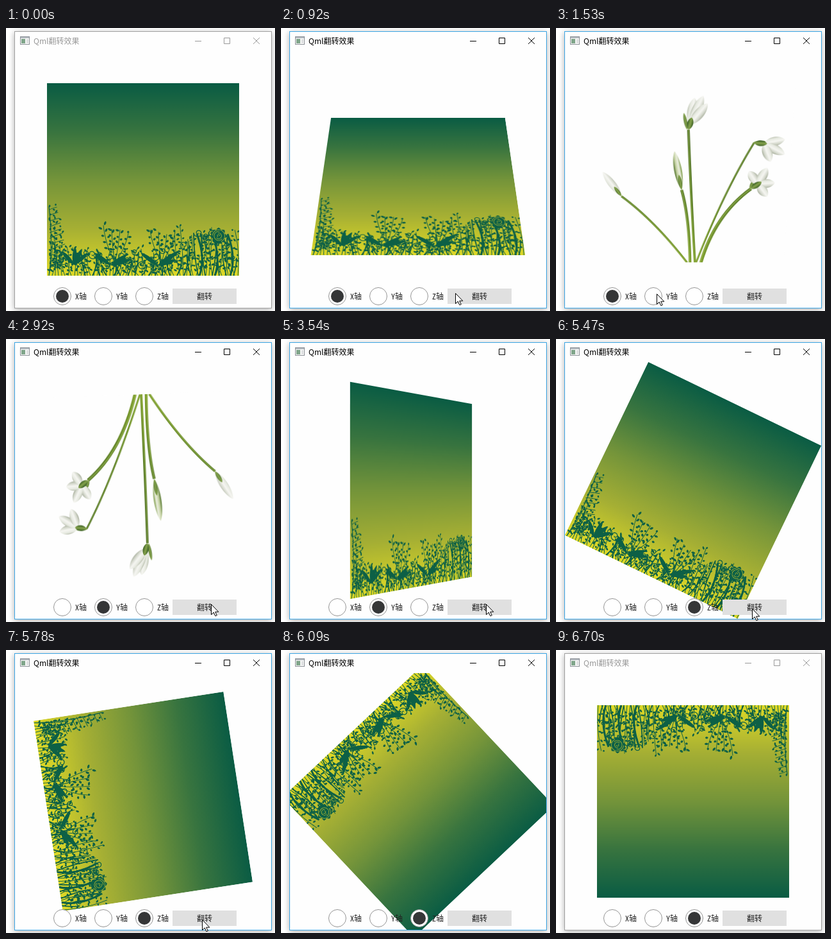
An HTML page with a canvas that plays this animation: 420 px wide and 441 px high, repeating every 6780 ms.

```html
<!DOCTYPE html>
<html lang="zh">
<head>
<meta charset="utf-8">
<title>Qml翻转效果</title>
<style>
html, body { margin: 0; width: 100%; height: 100%; overflow: hidden; background: #fff; }
#win {
  position: absolute; left: 13px; top: 5px; width: 400px; height: 430px;
  background: #fefefe; border: 1px solid #a0a0a0; box-shadow: 0 2px 9px rgba(0, 0, 0, .32);
}
#win.active { border-color: #3ba5e4; }
#view { position: absolute; left: 0; top: 30px; width: 400px; height: 400px; overflow: hidden; }
canvas { position: absolute; left: 50px; top: 50px; width: 300px; height: 300px; }
svg { position: absolute; left: 0; top: 0; }
text { font: 12px "Noto Sans CJK SC", "Noto Sans CJK", sans-serif; }
.label { font-family: "Noto Sans Mono CJK SC", "Noto Sans CJK SC", "Noto Sans CJK", monospace; fill: #222; }
</style>
</head>
<body>
<div id="win"><div id="view"><canvas id="back"></canvas><canvas id="front"></canvas></div></div>
<svg width="420" height="441" viewBox="0 0 420 441">
  <g id="icon">
    <rect x="22.5" y="13.5" width="14" height="12" fill="#f6f6f6" stroke="#8b9096"/>
    <path d="M23 15H36" stroke="#b4bac0" stroke-width="2"/>
    <rect x="24" y="17" width="6" height="7" fill="#7fa58a"/>
    <path d="M32 18.5H35M32 20.5H35M32 22.5H35" stroke="#c4c8cb"/>
  </g>
  <g id="caption">
    <text x="43" y="25">Qml翻转效果</text>
    <path d="M295 20.5H305M340.5 15.5H349.5V24.5H340.5ZM386 15L396 25M396 15L386 25" fill="none" stroke="currentColor"/>
  </g>
  <g id="radios"></g>
  <rect x="260" y="406" width="100" height="24" fill="#e0e0e0"/>
  <text class="label" x="310" y="423" text-anchor="middle">翻转</text>
  <path id="cursor" d="M.5 .5V16.5L4.2 13L6.9 18.7L9.3 17.6L6.7 12.2H11.8Z" fill="#fff" stroke="#000"/>
</svg>
<script>
const $ = id => document.getElementById(id);
const LOOP = 6780, FIRST = 150, STEP = 77.06, LAST = 85;
const AXES = ['X', 'Y', 'Z'];
const HOME = [292, 445];

// pointer moves: start, duration, x, y
const MOVES = [
  [73, 308, 281, 421], [458, 72, 272, 413], [920, 155, 157, 414], [2077, 228, 320, 413],
  [4234, 154, 212, 413], [4928, 228, 306, 420], [5776, 150, 312, 442]
];

function context(id) {
  const cv = $(id);
  cv.width = cv.height = 600;
  const c = cv.getContext('2d');
  c.scale(2, 2);
  return c;
}

function gradient(c, x1, y1, x2, y2, colors) {
  const g = c.createLinearGradient(x1, y1, x2, y2);
  colors.forEach((col, i) => g.addColorStop(i / (colors.length - 1), col));
  return g;
}

function bow(c, x, y, mx, my, u, v, width, color) {
  c.beginPath();
  c.moveTo(x, y);
  c.quadraticCurveTo(mx, my, u, v);
  c.lineWidth = width;
  c.strokeStyle = color;
  c.stroke();
}

function blade(c, x, y, angle, len, wide, fill) {
  c.save();
  c.translate(x, y);
  c.rotate(angle);
  c.beginPath();
  c.moveTo(0, 0);
  c.bezierCurveTo(len * .25, -wide, len * .8, -wide * .9, len, 0);
  c.bezierCurveTo(len * .8, wide * .9, len * .25, wide, 0, 0);
  c.fillStyle = fill;
  c.fill();
  c.restore();
}

function paintGarden() {
  const c = context('front'), ink = '#0d6046';
  let seed = 29;
  const rnd = (a, b) => {
    seed = (seed * 16807) % 2147483647;
    return a + (b - a) * seed / 2147483647;
  };
  const leaf = (x, y, a, len, wide) => blade(c, x, y, a, len, wide, ink);
  c.fillStyle = gradient(c, 0, 0, 0, 300, ['#0a5c44', '#38743f', '#74943a', '#a5af34', '#dfd926']);
  c.fillRect(0, 0, 300, 300);

  // bent twig, leafy on both sides from a given share of its length
  function twig(x, y, u, v, bend, bare, size) {
    const mx = (x + u) / 2 + bend, my = (y + v) / 2;
    bow(c, x, y, mx, my, u, v, .9, ink);
    const n = Math.hypot(u - x, v - y) * (1 - bare) / 5;
    for (let i = 0; i <= n; i++) {
      const k = bare + (1 - bare) * i / n, m = 1 - k;
      const a = Math.atan2(v - y, u - x) + (i % 2 ? 1 : -1) * rnd(.4, 1.4);
      const gap = rnd(0, 4);
      leaf(m * m * x + 2 * m * k * mx + k * k * u + gap * Math.cos(a),
        m * m * y + 2 * m * k * my + k * k * v + gap * Math.sin(a), a, size * rnd(.7, 1.3), size * .42);
    }
  }
  function curl(x, y, r, dir) {
    c.beginPath();
    for (let a = 0; a < 9; a += .25) {
      const q = r * (1 - a / 10);
      c.lineTo(x + q * Math.cos(a) * dir, y + q * Math.sin(a));
    }
    c.lineWidth = 1.2;
    c.strokeStyle = ink;
    c.stroke();
  }
  function bouquet(x) {
    for (let i = 0; i < 4; i++) twig(x, 280, x - 18 + i * 13, rnd(215, 236), (i - 1.5) * 4, .38, 5.5);
    bow(c, x, 300, x + 4, 288, x, 276, 2, ink);
    for (const a of [-.6, -.3, -2.5]) leaf(x - 6, 284, a, rnd(28, 42), 4.5);
  }
  const height = x => x < 30 ? 62 : x < 205 ? 46 : 80;

  // ferns along the left edge
  bow(c, 3, 300, 10, 250, 3, 192, 1.2, ink);
  for (let y = 193; y < 290; y += 9) twig(4, y + 4, 15 + (y - 190) * .2, y - rnd(0, 6), -2, 0, 4.5);

  for (let x = 3; x < 300; x += 5) {
    const h = height(x);
    twig(x, 300, x + rnd(-9, 9), 300 - h * rnd(.4, 1), rnd(-8, 8), .15, 4.4);
  }
  for (let x = 60; x < 298; x += 11) {
    const r = rnd(5, 9), y = 300 - height(x) * rnd(.3, .85), dir = rnd(0, 1) < .5 ? -1 : 1;
    curl(x, y, r, dir);
    bow(c, x, 300, x + dir * r, (y + 300) / 2, x + dir * r, y, 1.7, ink);
  }
  for (const a of [-2.3, -1.5, -1.1, -.7]) leaf(42, 283, a, 28, 4.5);
  bouquet(106);
  bouquet(179);
  for (let x = 238; x < 300; x += 24) bow(c, x, 300, x + 10, 272, x - 4, 235, 3, ink);

  // rose
  for (let i = 0; i < 8; i++) leaf(268, 238, i * .785, 13, 6);
  for (let r = 2; r < 10; r += 2.5) {
    c.beginPath();
    c.arc(268, 238, r, r, r + 4.2);
    c.lineWidth = .8;
    c.strokeStyle = '#a9b431';
    c.stroke();
  }
}

// foot x, bend x/y, head x/y, stem width, flower angle, spread, petals, length
const PLANTS = [
  [140, 88, 222, 37, 179, 3.6, -2.15, 0, 1, 50],
  [145, 144, 215, 132, 168, 4.6, -1.73, 0, 1, 66],
  [153, 146, 160, 143, 68, 4, -1.15, .5, 3, 45],
  [155, 199, 170, 243, 89, 3, .5, 1.4, 3, 34],
  [163, 185, 212, 241, 166, 5.4, -.6, 3.1, 4, 28]
];

function paintSnowdrops() {
  const c = context('back');
  c.fillStyle = '#fefefe';
  c.fillRect(0, 0, 300, 300);
  const green = gradient(c, 0, -4, 0, 4, ['#40642a', '#86a44c', '#486a2c']);
  const white = gradient(c, 0, -9, 0, 9, ['#a9b09c', '#e6e9e0', '#f6f6f2', '#d2d6ca', '#959d88']);
  const hull = gradient(c, 0, -6, 0, 6, ['#55762f', '#c6d3a4', '#edf0e2', '#7b9a45']);

  PLANTS.forEach(([foot, mx, my, x, y, width, angle, spread, count, len], n) => {
    bow(c, foot, 300, mx, my, x, y, width, gradient(c, 0, 80, 0, 300, ['#56762e', '#5f812c', '#7f9f30']));
    bow(c, foot - width / 4, 300, mx - width / 4, my, x, y, width / 4, 'rgba(172,198,90,.6)');
    if (count === 1) {
      blade(c, x, y, angle, len, 8.5, n ? hull : white);
      blade(c, x, y, angle, len * .4, 4, green);
      return;
    }
    // green cup between the stem and the fan of petals
    const tilt = n === 3 ? .1 : -.8;
    const px = x + 15 * Math.cos(tilt) * (n === 2 ? .2 : 1), py = y + 11 * Math.sin(tilt);
    blade(c, x - 2, y, angle - .6, len * .6, 3.5, green);
    for (let i = 0; i < count; i++) {
      const a = angle + spread * (i / (count - 1) - .5);
      blade(c, px, py, a, len * (i === 1 ? 1.1 : .95), 10.5, white);
    }
    blade(c, x, y, Math.atan2(py - y, px - x), 20, 6.5, green);
  });
}

function buildRadios() {
  $('radios').innerHTML = AXES.map((name, i) => {
    const x = 88 + 64 * i;
    return `<circle id="ring${i}" cx="${x}" cy="418" r="13.5" fill="#fff" stroke="#949494"/>` +
      `<circle id="dot${i}" cx="${x}" cy="418" r="10" fill="#353637"/>` +
      `<text class="label" x="${x + 20}" y="423">${name}轴</text>`;
  }).join('');
}

const part = (t, start, len) => Math.min(1, Math.max(0, (t - start) / len));

function angleAt(t) {
  if (t < 2500) return 180 * part(t, 670, 1000);
  if (t < 5000) return 180 * (1 - part(t, 2845, 972));
  return 180 * part(t, 5324, 1000);
}

function pointerAt(t) {
  return MOVES.reduce(([x, y], [start, len, u, v]) => {
    const k = part(t, start, len);
    return [x + (u - x) * k, y + (v - y) * k];
  }, HOME).map(Math.round);
}

function render(ms) {
  const k = Math.min(LAST, Math.floor((ms - FIRST + 10) / STEP));
  const t = k < 0 ? 0 : FIRST + k * STEP;
  const axis = t < 2070 ? 0 : t < 4920 ? 1 : 2;
  const angle = angleAt(t);
  const flipped = axis < 2 && angle > 90;
  const turn = `perspective(1024px) rotate${AXES[axis]}(${angle}deg)`;
  $('front').style.transform = turn;
  $('back').style.transform = turn + ' scaleY(-1)';
  $('front').style.visibility = flipped ? 'hidden' : 'visible';
  $('back').style.visibility = flipped ? 'visible' : 'hidden';

  const active = t > 525 && t < 6695;
  $('win').className = active ? 'active' : '';
  $('caption').style.color = $('caption').style.fill = active ? '#000' : '#999';

  const pressed = t > 1990 && t < 2070 ? 1 : t > 4840 && t < 4920 ? 2 : -1;
  AXES.forEach((_, i) => {
    $('dot' + i).style.visibility = i === axis ? 'visible' : 'hidden';
    $('ring' + i).style.fill = i === pressed ? '#f4f4f4' : '#fff';
    $('ring' + i).style.stroke = i === pressed ? '#808080' : '#949494';
  });
  $('cursor').setAttribute('transform', `translate(${pointerAt(t)})`);
}

paintGarden();
paintSnowdrops();
buildRadios();
const begin = performance.now();
function tick() {
  render((performance.now() - begin) % LOOP);
  requestAnimationFrame(tick);
}
tick();
</script>
</body>
</html>
```
